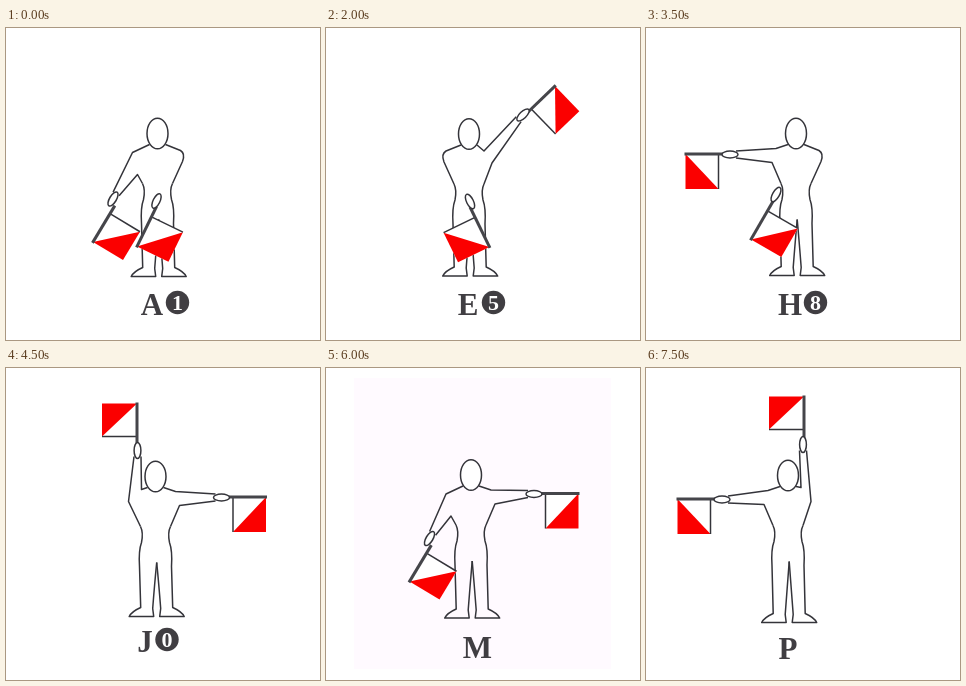
An HTML page that plays this animation: 314x312 px, repeating every 8000 ms.

```html
<!DOCTYPE html>
<html lang="en">
<head>
<meta charset="utf-8">
<title>Semaphore alphabet</title>
<style>
  html, body { margin: 0; width: 100%; height: 100%; overflow: hidden; background: #fff; }
  svg { display: block; width: 314px; height: 312px; }
  .pose { visibility: hidden; animation: show 8s step-end infinite; }
  @keyframes show {
    0% { visibility: visible; }
    6.25%, 100% { visibility: hidden; }
  }
  .line { fill: none; stroke: #34343a; stroke-width: 1.5; stroke-linejoin: round; }
  .white { fill: #fff; stroke: #34343a; stroke-width: 1.5; }
  .red { fill: #fb0000; }
  .pole { stroke: #45454a; stroke-width: 3; }
  text { font: bold 31px "Liberation Serif", "Noto Serif", serif; text-anchor: middle; fill: #403e42; }
  .disc { fill: #403e42; }
  .digit { font-size: 22px; fill: #fff; }
</style>
</head>
<body>
<svg id="stage" viewBox="0 0 314 312"></svg>
<script>
// Arms are drawn for the viewer's left, measured from the head centre, and mirrored for the right.
// top / under: shoulder and armpit; both absent when the arm lies in front of the body.
const ARMS = {
  down:      { hand: [1, 67.5], tip: [20.5, 113], angle: 64, side: -1 },
  low:       { top: [-25, 19], under: [-20, 41], hand: [-44.5, 65.5], tip: [-64.5, 108.5], angle: 121, side: 1 },
  wide:      { top: [-24, 18], under: [-21, 38], hand: [-58, 52], tip: [-90, 84], angle: 135, side: 1 },
  flat:      { top: [-20, 15], under: [-24, 29], hand: [-66, 21], tip: [-110.5, 20.5], angle: 180, side: 1 },
  high:      { top: [-15, 17], under: [-23, 29], hand: [-50, -12], tip: [-82, -41], angle: 224, side: 1 },
  up:        { top: [-14, 13], under: [-27, 25], hand: [-18, -26], tip: [-18.5, -73], angle: 270, side: 1 },
  upIn:      { top: [-13, 12], under: [-23, 26], hand: [-15, -29], tip: [-16, -77], angle: 270, side: -1 },
  crossLow:  { hand: [20, 61], tip: [45, 106], angle: 60, side: -1 },
  crossFlat: { hand: [27, 25], tip: [73, 25], angle: 0, side: -1 }
};

// letter, digit, head x, head y, foot depth, label x, label baseline, left arm, right arm
// An arm is a name with an optional shift of hand and flag.
const POSES = [
  ["A", "1", 151.5, 105.5, 143, 146, 287, ["low"], ["down"]],
  ["B", "2", 146, 105.5, 142, 143, 287, ["flat", -4], ["down"]],
  ["C", "3", 150, 107, 142, 145, 288, ["high", -7, -15], ["down"]],
  ["D", "4", 153.5, 109, 141, 146, 288, ["up"], ["down", 6, -5]],
  ["E", "5", 143, 106, 142, 142, 287, ["down"], ["high", -4, -7]],
  ["F", "6", 146, 106, 142, 142, 287, ["down"], ["flat", -6]],
  ["G", "7", 142.5, 105.5, 142, 141, 286, ["down", 1.5, -1.5], ["low", -1, -2]],
  ["H", "8", 150, 105.5, 142, 144, 287, ["flat"], ["crossLow"]],
  ["I", "9", 152, 107, 141, 147, 287, ["high", 13, -21], ["crossLow"]],
  ["J", "0", 149.5, 108.5, 140, 139, 284, ["up"], ["flat"]],
  ["K", "", 146, 107, 141, 147, 285, ["low"], ["upIn"]],
  ["L", "", 141, 108, 142, 146, 285, ["low"], ["high", -11, -6]],
  ["M", "", 145, 107, 143, 151.5, 290, ["low", 3, -2], ["flat", 3, -2]],
  ["N", "", 143, 113, 143, 148, 296, ["wide"], ["wide"]],
  ["O", "", 145.5, 104.5, 147, 148.5, 287, ["high"], ["crossFlat"]],
  ["P", "", 142, 107.5, 147, 142, 291, ["flat", 0, 3], ["upIn", 0, -2]]
];

const path = d => `<path class="line" d="${d}"/>`;

function shoulder(arm, hx, hy) {
  if (!arm.top) return path("M-8,11 L-23,17 Q-28,20 -25,28 L-15,50");
  const a = arm.angle * Math.PI / 180, dx = Math.cos(a), dy = Math.sin(a);
  const wrist = s => [hx - 6 * dx + s * dy, hy - 6 * dy - s * dx];
  return path(`M-8,11 L${arm.top} L${wrist(-3.5)} M${wrist(3.5)} L${arm.under} L-15,50`);
}

function flag(arm, hx, hy, tx, ty) {
  const w = -35 * arm.side;
  const pole = Math.hypot(tx - hx, ty - hy) - 5;
  return `<g transform="translate(${tx} ${ty}) rotate(${arm.angle})">
      <path class="white" d="M-33,0 V${w} H0 V0 Z" style="stroke:none"/>
      <path class="red" d="M0,0 V${w} H-33 Z"/>
      <path class="line" d="M-33,0 V${w}"/>
      <path class="pole" d="M${-pole},0 H1"/>
    </g>
    <ellipse class="white" rx="8" ry="3.4" transform="translate(${hx} ${hy}) rotate(${arm.angle})"/>`;
}

// The feet stand slightly to the right of the head.
function leg(h, flip) {
  const x = v => v + 1.2 * flip;
  return path(`M-15,50 Q-12,56 -14,66 Q-17,74 -16,90 L${x(-16)},${h - 9}
    Q${x(-25)},${h - 5} ${x(-27.5)},${h} L${x(-3)},${h} L${x(-4)},${h - 8} Q${x(-2)},${h - 34} ${x(0)},86`);
}

function half([name, sx = 0, sy = 0], h, flip) {
  const arm = ARMS[name];
  const [hx, hy] = [arm.hand[0] + sx, arm.hand[1] + sy];
  const [tx, ty] = [arm.tip[0] + sx, arm.tip[1] + sy];
  const wrap = s => `<g transform="scale(${flip} 1)">${s}</g>`;
  return { body: wrap(shoulder(arm, hx, hy) + leg(h, flip)), flag: wrap(flag(arm, hx, hy, tx, ty)) };
}

function pose([letter, digit, x, y, h, lx, base, left, right], i) {
  const l = half(left, h, 1), r = half(right, h, -1);
  const tint = letter === "M" ? '<rect x="28" y="10" width="257" height="291" fill="#fffaff"/>' : "";
  const gap = "IJ".includes(letter) ? 22 : 25.5;
  const number = digit && `<circle class="disc" cx="${lx + gap}" cy="${base - 12.5}" r="11.7"/>
    <text class="digit" x="${lx + gap}" y="${base - 5}">${digit}</text>`;
  return `<g class="pose" style="animation-delay:${i * 0.5 - 8}s">${tint}
    <g transform="translate(${x} ${y})">${l.body}${r.body}
      <ellipse class="white" rx="10.5" ry="15.3"/>${l.flag}${r.flag}</g>
    <text x="${lx}" y="${base}">${letter}</text>${number}</g>`;
}

document.getElementById("stage").innerHTML = POSES.map(pose).join("");
</script>
</body>
</html>
```
